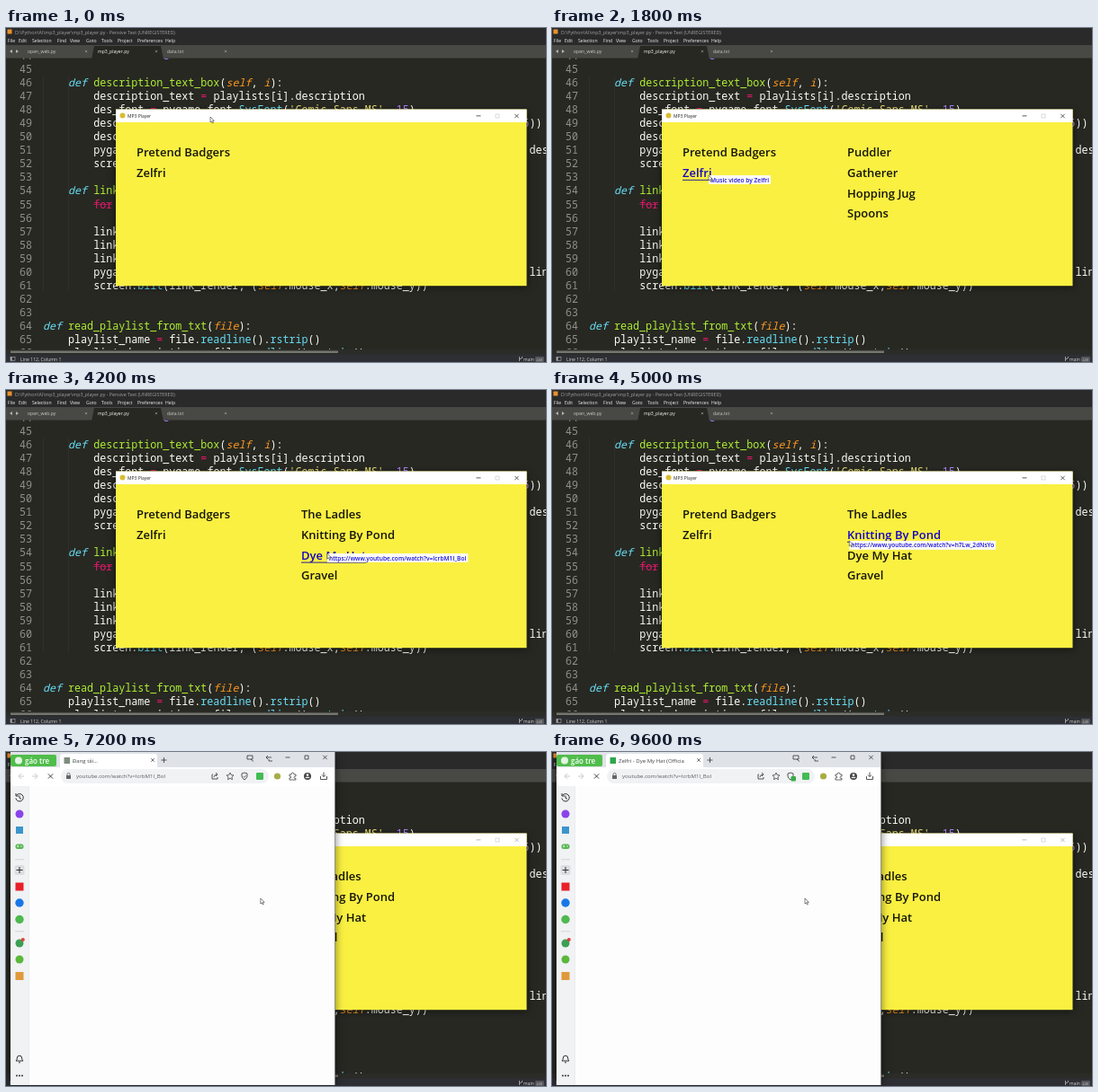
Recreate the animation shown at these times as an HTML page with a canvas. Size 600x372 px, loop 9700 ms.

```html
<!DOCTYPE html>
<html lang="en">
<head>
<meta charset="utf-8">
<title>Playlist window</title>
<style>
html, body { margin: 0; width: 100%; height: 100%; overflow: hidden; background: #272822; }
canvas { display: block; width: 600px; height: 372px; }
</style>
</head>
<body>
<canvas id="stage" width="600" height="372"></canvas>
<script>
const ctx = document.getElementById('stage').getContext('2d');
const LOOP = 9700, STEP = 100;
const UI = '"Open Sans", sans-serif', MONO = '"Noto Sans Mono", monospace';
const OPEN_AT = 5200, CHROME_AT = 6200, TITLE_AT = 8500;

const artists = ['Pretend Badgers', 'Zelfri'];
const songs = [
  ['Puddler', 'Gatherer', 'Hopping Jug', 'Spoons'],
  ['The Ladles', 'Knitting By Pond', 'Dye My Hat', 'Gravel']
];
const videoIds = ['qT4mZr0_kWe', 'h7Lw_2dNsYo', 'IcrbM1l_BoI', '_ovdm2yX4MA'];

// time, x, y of the pointer tip
const path = [
  [0, 227, 99], [200, 227, 99], [700, 192, 138], [1200, 192, 139], [1700, 174, 164],
  [2100, 174, 164], [2700, 346, 141], [3200, 354, 209], [3500, 354, 209],
  [4100, 357, 182], [4600, 357, 182], [5200, 321, 163], [5700, 321, 163],
  [6700, 283, 163], [9600, 281, 163]
];

function rect(x, y, w, h, color) {
  ctx.fillStyle = color;
  ctx.fillRect(x, y, w, h);
}
function round(x, y, w, h, r, color) {
  ctx.fillStyle = color;
  ctx.beginPath();
  ctx.roundRect(x, y, w, h, r);
  ctx.fill();
}
function dot(x, y, r, color) {
  ctx.fillStyle = color;
  ctx.beginPath();
  ctx.arc(x, y, r, 0, Math.PI * 2);
  ctx.fill();
}
function text(str, x, y, size, color, style = '', family = UI) {
  ctx.font = `${style} ${size}px ${family}`;
  ctx.fillStyle = color;
  ctx.fillText(str, x, y);
  return ctx.measureText(str).width;
}
function stroke(d, color, width = 0.9) {
  ctx.strokeStyle = color;
  ctx.lineWidth = width;
  ctx.stroke(new Path2D(d));
}
function cross(x, y, r, color, width = 0.8) {
  stroke(`M${x - r} ${y - r}l${2 * r} ${2 * r}m0 ${-2 * r}l${-2 * r} ${2 * r}`, color, width);
}
function shadowed(blur, draw) {
  ctx.save();
  ctx.shadowColor = 'rgba(0,0,0,.5)';
  ctx.shadowBlur = blur;
  ctx.shadowOffsetY = 2;
  draw();
  ctx.restore();
}

const INK = { w: '#fdfdf8', b: '#68def6', g: '#afee34', o: '#fd971f', p: '#e5176c', s: '#e6db74', n: '#ae81ff', c: '#68def6' };
const ITALIC = 'bo';

// Each part is a colour key followed by the text.
const code = [
  [44, 8, 'preturn ', 'nFalse'],
  [46, 4, 'bdef ', 'gdescription_text_box', 'w(', 'oself', 'w, ', 'oi', 'w):'],
  [47, 8, 'wdescription_text ', 'p= ', 'wplaylists[i].description'],
  [48, 8, 'wdes_font ', 'p= ', 'wpygame.font.', 'cSysFont', 'w(', "s'Comic Sans MS'", 'w, ', 'n15', 'w)'],
  [49, 8, 'wdescription'], [49, 76, 'n5', 'w))'],
  [50, 8, 'wdescription'],
  [51, 8, 'wpygame'], [51, 77, 'wdescription'],
  [52, 8, 'wscreen'],
  [54, 4, 'bdef ', 'glink_text'],
  [55, 8, 'pfor'],
  [57, 8, 'wlink_'], [58, 8, 'wlink_'], [59, 8, 'wlink_'],
  [60, 8, 'wpygame'], [60, 77, 'wlink'],
  [61, 8, 'wscreen.', 'cblit', 'w(link_render, (', 'oself', 'w.mouse_x,', 'oself', 'w.mouse_y))'],
  [64, 0, 'bdef ', 'gread_playlist_from_txt', 'w(', 'ofile', 'w):'],
  [65, 4, 'wplaylist_name ', 'p= ', 'wfile.', 'creadline', 'w().', 'crstrip', 'w()'],
  [66, 4, 'wplaylist_description ', 'p= ', 'wfile.', 'creadline', 'w().', 'crstrip', 'w()']
];

function drawEditor() {
  rect(0, 0, 600, 372, '#272822');
  const lineY = n => 50.2 + (n - 45) * 15.03;
  for (const x of [41, 69]) rect(x, 53, 0.7, 240, '#33342d');
  for (let n = 44; n <= 66; n++) text(n, 15, lineY(n), 11.7, '#8f908a', '', MONO);
  for (const [n, col, ...parts] of code) {
    let x = 41 + col * 7.02;
    for (const part of parts) {
      const key = part[0];
      const style = ITALIC.includes(key) ? 'italic 500' : '500';
      x += text(part.slice(1), x, lineY(n), 11.7, INK[key], style, MONO);
    }
  }
  rect(97, 196.3, 21, 0.6, INK.p);

  rect(0, 0, 600, 19, '#2a2a2b');
  rect(1.5, 1.5, 5, 5, '#e8912d');
  text('D:\\Python\\AI\\mp3_player\\mp3_player.py - Pensive Text (UNREGISTERED)', 10, 6.7, 5.3, '#a2a2a2');
  const menu = { File: 2, Edit: 14, Selection: 29, Find: 57, View: 71, Goto: 89, Tools: 106, Project: 124, Preferences: 146, Help: 177 };
  for (const name in menu) text(name, menu[name], 16, 5.1, '#f2f2f2');

  rect(0, 19, 600, 14.5, '#484845');
  ctx.fillStyle = '#272822';
  ctx.fill(new Path2D('M95 35L98 20H172L175 35Z'));
  ctx.fillStyle = '#b5b5b0';
  ctx.fill(new Path2D('M7 24v4l-3-2zM11 24v4l3-2z'));
  text('open_web.py', 24, 28, 5.1, '#cacac6');
  text('mp3_player.py', 102, 28, 5.1, '#fafaf6');
  text('data.txt', 179, 28, 5.1, '#cacac6');
  for (const x of [89, 167, 244]) cross(x, 26, 1.2, '#a5a5a0', 0.6);

  rect(0, 358, 600, 6, '#2b2c27');
  rect(5, 359.5, 364, 2.5, '#74756f');
  rect(0, 363.5, 600, 8.5, '#2e2f34');
  ctx.strokeStyle = '#aaa';
  ctx.lineWidth = 0.6;
  ctx.strokeRect(5, 366.5, 5, 4);
  rect(5, 366.5, 1.7, 4, '#aaa');
  text('Line 112, Column 1', 16, 371, 5.1, '#d8d8d8');
  stroke('M570.5 366v5M573.5 366v1.5l-3 1.5', '#ccc', 0.7);
  text('main', 575, 371, 5, '#dedede');
  round(588, 366, 10, 6, 1, '#55565b');
  text('240', 589.3, 370.7, 4, '#c8c8c8');
}

function drawEntry(label, x, row, mouse) {
  const base = 143 + row * 22.8;
  ctx.font = `600 13px ${UI}`;
  const width = ctx.measureText(label).width;
  const over = mouse && mouse.x >= x && mouse.x <= x + width && Math.abs(mouse.y - base + 5) < 9.5;
  text(label, x, base, 13, over ? '#1405c4' : '#15150c', '600');
  if (over) rect(x, base + 3, width, 1, '#2a2190');
  return over;
}

function drawTip(label, { x, y }) {
  ctx.font = `600 6.6px ${UI}`;
  rect(x, y, ctx.measureText(label).width + 4, 10, '#fbfbf4');
  text(label, x + 2, y + 7.5, 6.6, '#1a10e0', '600');
}

function drawPlayer(t, mouse) {
  shadowed(8, () => rect(122, 90.6, 456.5, 196.6, '#faf042'));
  rect(122, 90.6, 456.5, 14.4, '#fff');
  dot(129.5, 97.5, 3, '#d9bd32');
  text('MP3 Player', 135, 100, 5, '#222');
  const dim = t >= CHROME_AT ? '#aaa' : '#333';
  rect(522.5, 97.5, 5, 0.8, dim);
  ctx.strokeStyle = '#ccc';
  ctx.lineWidth = 0.7;
  ctx.strokeRect(544, 96, 4, 4);
  cross(567.5, 98, 2.2, dim);

  const hover = t < OPEN_AT ? mouse : null;
  let tip = '';
  artists.forEach((name, row) => {
    if (drawEntry(name, 145, row, hover)) tip = 'Music video by ' + name;
  });
  if (t >= 900) {
    songs[t < 2000 ? 0 : 1].forEach((name, row) => {
      if (drawEntry(name, 328, row, hover)) tip = 'https://www.youtube.com/watch?v=' + videoIds[row];
    });
  }
  if (tip) drawTip(tip, mouse);
}

function drawTabs(loaded) {
  rect(5, 0, 360, 17, '#dfe3e8');
  round(5, 3, 51, 13, 2, '#50bd4b');
  dot(14, 9.5, 4, '#e4f6e2');
  text('gáo tre', 21, 12.5, 8, '#fff', '600');
  round(60, 2, 108, 16, [3, 3, 0, 0], '#fff');
  rect(64.5, 6, 6.5, 7, loaded ? '#2fa64c' : '#7d8b7d');
  ctx.save();
  ctx.beginPath();
  ctx.rect(74, 2, 82, 15);
  ctx.clip();
  text(loaded ? 'Zelfri - Dye My Hat (Officia' : 'Đang tải...', 74, 11.5, 6, '#3c3f43');
  ctx.restore();
  cross(163, 9, 1.8, '#555');
  stroke('M172.5 9h6M175.5 6v6', '#444');
  stroke('M268 4h6v4h-6zM272 8l3 2.5M289 6h6M289 6l2-2M289 6l2 2M292 8v2h4', '#333', 0.8);
  stroke('M310.5 6h5M332 4h4v4h-4z', '#333', 0.8);
  cross(354.5, 6, 2.2, '#333');
}

function drawToolbar(loaded) {
  rect(5, 17, 360, 21, '#fff');
  stroke('M20 27h-6m3-3l-3 3 3 3M29 27h6m-3-3l3 3-3 3', '#c3c5c8');
  cross(49.5, 27, 2.6, '#444', 1);
  round(61, 19, 231, 16, 8, '#f0f2f4');
  rect(67, 26, 5, 4, '#666');
  stroke('M68 26v-2q1.5-1.5 3 0v2', '#666', 0.8);
  text('youtube.com/watch?v=IcrbM1l_BoI', 78, 29.3, 6.1, '#5a5d61');
  stroke('M230 25h-1v5h6v-2M231 28q0-3 4-3m-2-2l2 2-2 2', '#444');
  stroke('M249 23l1.2 2.6 2.8.3-2.1 2 .6 2.8-2.5-1.4-2.5 1.4.6-2.8-2.1-2 2.8-.3z', '#444', 0.8);
  stroke('M265 23l3 1v3q-.5 2.5-3 4-2.5-1.5-3-4v-3z', '#444');
  if (loaded) round(265.5, 27, 5.5, 5.5, 1, '#38ad48');
  else stroke('M263.5 27l1.3 1.3 2-2.3', '#444', 0.7);
  round(278, 23, 8, 8, 1, '#43bc55');
  dot(301.5, 27, 3.6, '#a8ad45');
  stroke('M315 25h2q0-2 1.5-2t1.5 2h2v2q-2 0-2 1.3t2 1.2v1.5h-7v-2q2 0 2-1t-2-1z', '#444', 0.8);
  dot(335, 27, 4, '#444');
  dot(335, 25.6, 1.3, '#fff');
  rect(332.8, 27.8, 4.4, 1.3, '#fff');
  stroke('M353 22.5v5m-2-2l2 2 2-2M349.5 27v3.5h7v-3.5', '#444');
}

function drawSidebar() {
  rect(5, 38, 20, 333, '#f0f2f4');
  rect(25, 38, 0.6, 333, '#dfe1e4');
  stroke('M11.5 48.5a4.2 4.2 0 1 1-.6 3M11 46v3h3M15 48.5v2.8l2 1', '#333', 1);
  dot(15, 69, 4.5, '#8a43ea');
  rect(11, 83, 8, 8, '#3a95cc');
  round(10.5, 102.5, 9, 5.5, 2.5, '#59b653');
  stroke('M12 105h2.4M13.2 103.8v2.4', '#fff', 0.7);
  dot(17, 105, 0.7, '#fff');
  rect(10, 119.5, 10, 0.7, '#c5c7ca');
  round(9.5, 126, 11, 11, 2, '#dcdee1');
  stroke('M11.5 131.5h7M15 128v7', '#333', 1);
  rect(10.5, 145.5, 9, 9, '#e8202a');
  dot(15, 168, 4.7, '#1978e5');
  dot(15, 186.5, 4.7, '#4db94e');
  rect(10, 199.5, 10, 0.7, '#c5c7ca');
  dot(15, 213, 4.5, '#3c9f55');
  dot(18.8, 209, 2, '#e63b36');
  dot(15, 231, 4.5, '#5ab83b');
  rect(10.5, 245, 9, 9, '#e09a3c');
  stroke('M11 344h8q-1.3-1-1.3-3 0-2.8-2.7-2.8t-2.7 2.8q0 2-1.3 3zM14 345.8h2', '#333', 1);
  for (const x of [12, 15, 18]) dot(x, 360.5, 1, '#333');
}

function drawBrowser(t) {
  shadowed(9, () => rect(5, 0, 360.5, 371, '#fefdfd'));
  if (t >= CHROME_AT) {
    const loaded = t >= TITLE_AT;
    drawTabs(loaded);
    drawToolbar(loaded);
    drawSidebar();
  }
  rect(365, 0, 0.7, 371, '#777');
}

function pointerAt(t) {
  const i = Math.max(1, path.findIndex(p => p[0] >= t));
  const [t0, x0, y0] = path[i - 1], [t1, x1, y1] = path[i];
  const u = (t - t0) / (t1 - t0), k = u * u * (3 - 2 * u);
  return { x: x0 + (x1 - x0) * k, y: y0 + (y1 - y0) * k };
}

function drawPointer({ x, y }) {
  const arrow = new Path2D(`M${x} ${y}v6l1.4-1.2 1 2.2 1-.4-.9-2.2h1.8z`);
  ctx.fillStyle = '#fff';
  ctx.fill(arrow);
  ctx.strokeStyle = '#333';
  ctx.lineWidth = 0.6;
  ctx.stroke(arrow);
}

function render(now) {
  const t = Math.floor((now % LOOP) / STEP) * STEP;
  const mouse = pointerAt(t);
  drawEditor();
  drawPlayer(t, mouse);
  if (t >= OPEN_AT) drawBrowser(t);
  drawPointer(mouse);
}

const start = performance.now();
function tick() {
  render(performance.now() - start);
  requestAnimationFrame(tick);
}
tick();
</script>
</body>
</html>
```
